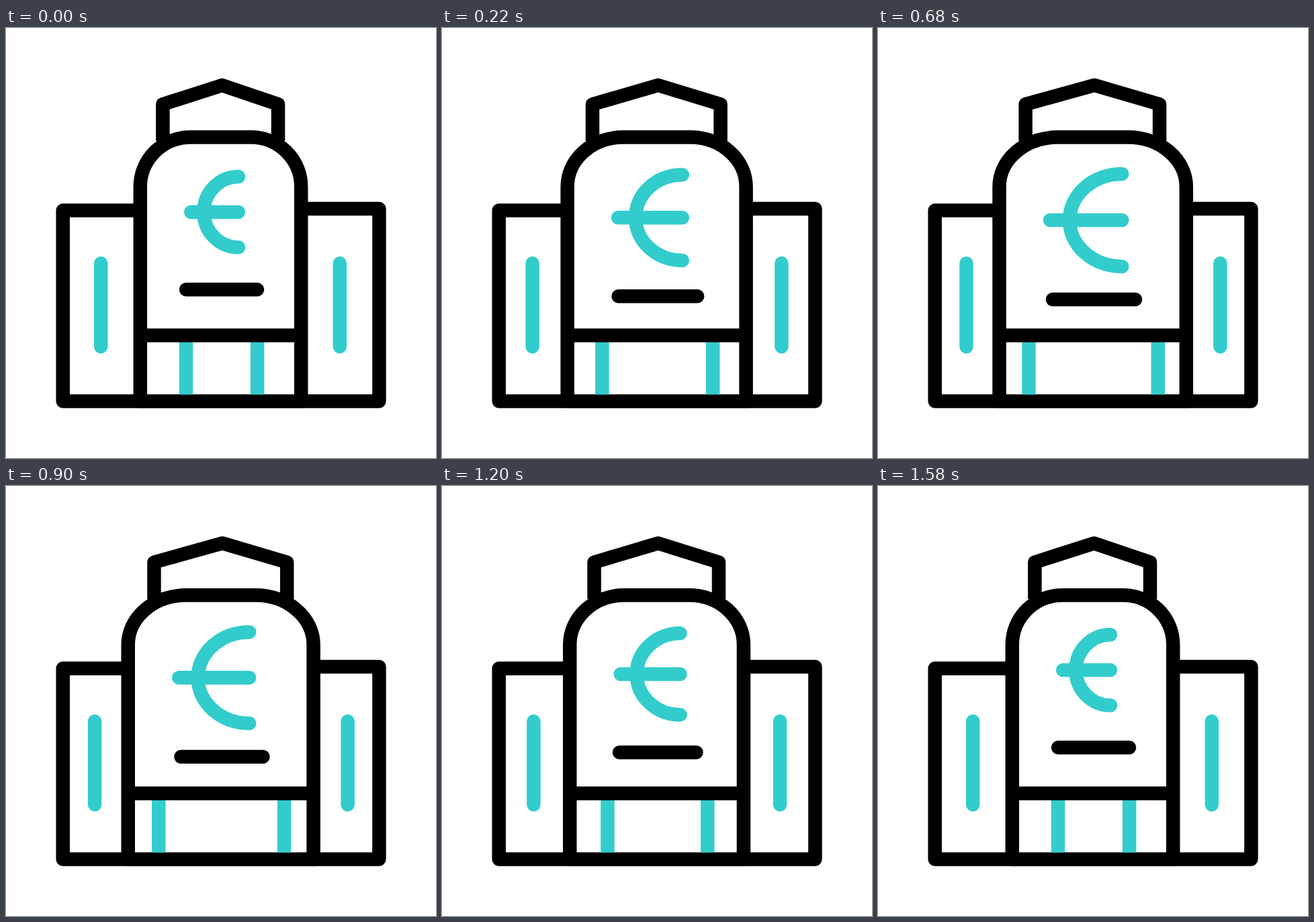
Animation of 640 by 640 pixels, one loop 1800 ms. Source, as an HTML page without scripts:

```html
<!DOCTYPE html>
<html lang="en">
<head>
<meta charset="utf-8">
<title>Bank building</title>
<style>
  @property --grow { syntax: "<number>"; inherits: true; initial-value: 0; }

  html, body { margin: 0; width: 100%; height: 100%; overflow: hidden; background: #fff; }

  svg {
    display: block;
    width: 640px;
    height: 640px;
    fill: none;
    stroke: #000;
    stroke-width: 20.5;
    stroke-linejoin: round;
    animation: breathe 1800ms infinite;
  }

  /* widen until 640 ms, return by 1600 ms, then rest */
  @keyframes breathe {
    0% { --grow: 0; animation-timing-function: cubic-bezier(.29, 0, .06, 1); }
    35.556% { --grow: 1; animation-timing-function: cubic-bezier(.73, 0, .49, 1); }
    88.889%, 100% { --grow: 0; }
  }

  path { vector-effect: non-scaling-stroke; }
  .teal { stroke: #3cc; }
  .round { stroke-linecap: round; }

  .wide {
    transform-origin: 318.5px 0;
    transform: translateY(calc(var(--grow) * var(--drop, 0px))) scaleX(calc(1 + .1625 * var(--grow)));
  }
  .slide { transform: translateX(calc(var(--grow) * var(--dx))); }
  .euro {
    transform-origin: 312.5px 234.5px;
    transform: scale(calc(1 + .517 * var(--grow)), calc(1 + .31 * var(--grow)));
  }
</style>
</head>
<body>
<svg viewBox="0 0 640 640">
  <path d="M199 271.4H84.7V555.4H555.4V269H440"/>
  <path class="wide" d="M233.4 168V113.5L321.6 85.2L405 113.5V168"/>
  <path class="wide" fill="#fff" d="M199.8 555.4V236.2A74.4 73.6 0 0 1 274.2 162.6H364.8A74.4 73.6 0 0 1 439.2 236.2V555.4Z"/>

  <g class="teal">
    <path class="slide" style="--dx: -43.5px" d="M268 460V545.4"/>
    <path class="slide" style="--dx: 42.7px" d="M374.1 460V545.4"/>
  </g>
  <path class="wide" d="M199.8 457.6H439.2"/>

  <g class="teal round">
    <path class="slide" style="--dx: -9.7px" d="M141.2 350.3V474.2"/>
    <path class="slide" style="--dx: 12.6px" d="M496.8 350.3V474.2"/>
    <path class="euro" d="M346 221.3A51.6 52.6 0 0 0 346 326.5M275.2 273.9H346"/>
  </g>
  <path class="wide round" style="--drop: 14.6px" d="M268.1 389.3H374"/>
</svg>
</body>
</html>
```
